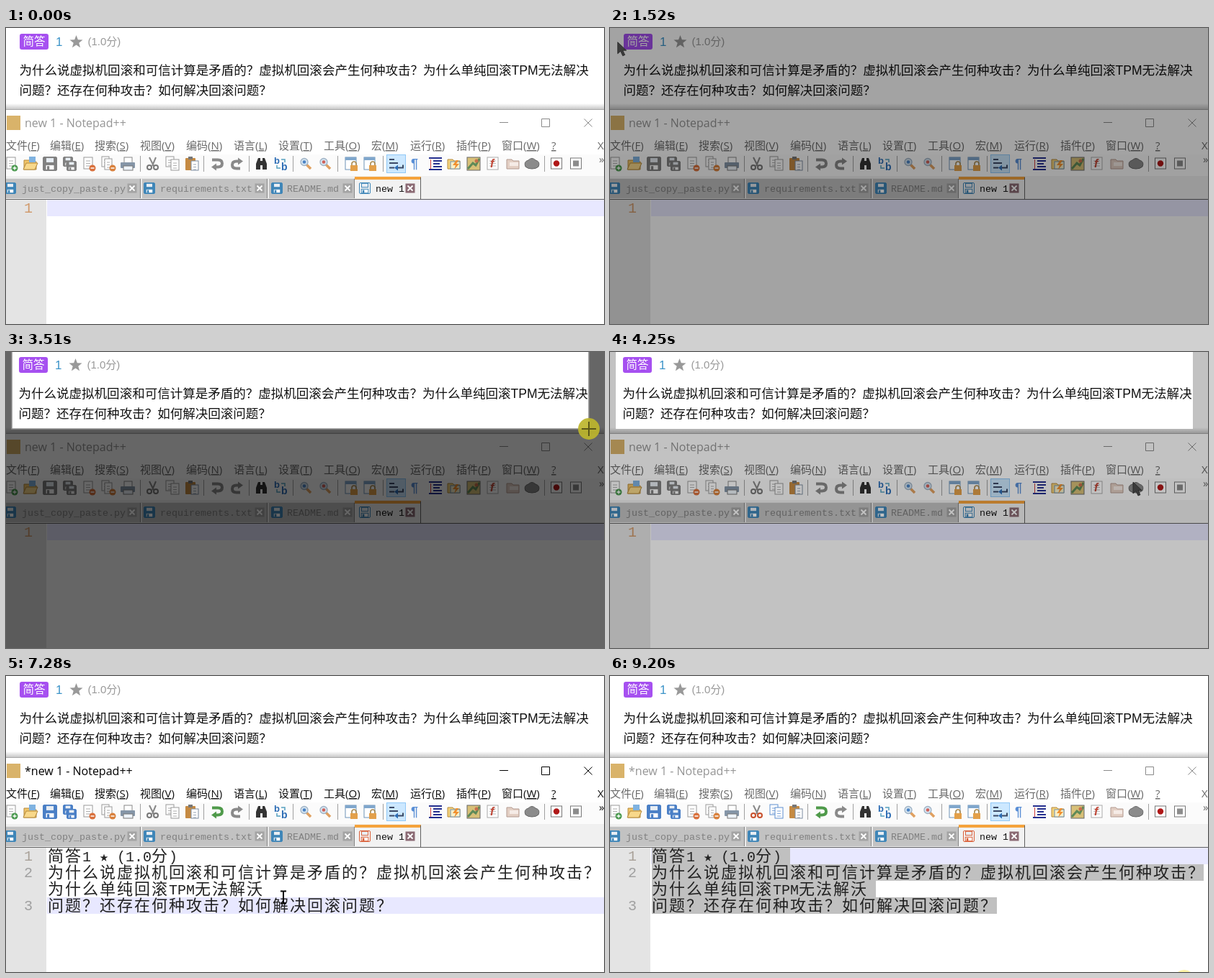
Write an HTML page that moves like this. It is 830 px wide and 412 px high and loops after 9.27 s.

```html
<!DOCTYPE html>
<html lang="zh-CN">
<head>
<meta charset="utf-8">
<title>截图识别演示</title>
<style>
html, body { margin: 0; width: 100%; height: 100%; overflow: hidden; background: #fff; }
svg { display: block; width: 830px; height: 412px; }
text { white-space: pre; }
.head { font-family: 'Liberation Sans', 'Noto Sans CJK SC', 'Noto Sans CJK', sans-serif; }
.ui { font-family: 'Open Sans', 'Noto Sans CJK SC', 'Noto Sans CJK', sans-serif; fill: var(--ui); }
.tab { font: 13.33px 'Liberation Mono', monospace; fill: #808080; }
.code { font: 20px 'Liberation Mono', 'DejaVu Sans Mono', monospace; fill: #222; }
.han { font: 300 22px 'Noto Sans CJK SC', 'Noto Sans CJK', sans-serif; letter-spacing: 2px; }
.win { fill: none; stroke: var(--btn); }
.line { fill: none; stroke-width: 2; }
#stage { --ui: #6a6a6a; --btn: #8a8a8a; --title: #959595; --save: #808080; --undo: #8a8a8a; --doc: #3f86b8; --cut: #777; --copy: #999; }
#stage.focus { --ui: #111; --btn: #000; --title: #000; }
#stage.dirty { --save: #4a7fc6; --undo: #4f9a4a; --doc: #d9603a; }
#stage.picked { --cut: #c8502c; --copy: #5f8fd0; }
</style>
</head>
<body>
<svg id="stage" viewBox="0 0 830 412"></svg>
<script>
const LOOP = 9270, STEP = 70;
const stage = document.getElementById('stage');

// ---- drawing helpers ----
const rect = (x, y, w, h, fill, more = '') =>
  `<rect x="${x}" y="${y}" width="${w}" height="${h}" fill="${fill}" ${more}/>`;
const path = (d, more) => `<path d="${d}" ${more}/>`;
const dot = (x, y, r, fill, more = '') => `<circle cx="${x}" cy="${y}" r="${r}" fill="${fill}" ${more}/>`;
const label = (x, y, size, s, more = '') => `<text x="${x}" y="${y}" font-size="${size}" ${more}>${s}</text>`;
const stroke = (d, c, w = 2) => path(d, `fill="none" stroke="${c}" stroke-width="${w}"`);

const page = (x, y, c = '#999', w = 12, h = 16) => rect(x, y, w, h, '#fff', `stroke="${c}"`) +
  stroke(`M${x + 3} ${y + 5}h${w - 6}M${x + 3} ${y + 8.5}h${w - 6}M${x + 3} ${y + 12}h${w - 6}`, c, .8);
const floppy = (x, y, s, c, body = c) => rect(x + .5, y + .5, s - 1, s - 1, body, `rx="1.5" stroke="${c}"`) +
  rect(x + s * .22, y + s * .08, s * .56, s * .34, '#e8eef4', `stroke="${c}"`) +
  rect(x + s * .2, y + s * .58, s * .6, s * .34, '#fff', `stroke="${c}"`) +
  rect(x + s * .3, y + s * .66, s * .16, s * .26, c);
const folder = (x, y, c, edge) =>
  path(`M${x} ${y + 15}v-13h7l2 2h8v11z`, `fill="${c}" stroke="${edge}"`);
const lens = (x, c) => stroke(`M${x + 1} 190l6 6`, '#e0a060', 3.5) +
  dot(x - 2, 186.5, 5, '#d5e4f0', 'stroke="#9fb2c4" stroke-width="1.3"') + dot(x - 2, 186.5, 2.3, c);
const windowIcon = (x) => rect(x - 9, 180, 15, 17, '#fff', 'stroke="#6f94b8"') + rect(x - 9, 180, 15, 4, '#7fa6cc') +
  stroke(`M${x} 191v-2a3 3 0 0 1 6 0v2`, '#a98a50', 1.6) + rect(x - 2, 191, 10, 8, '#e3a04a');
const cross = (x, y, r) => `M${x - r} ${y - r}l${2 * r} ${2 * r}M${x + r} ${y - r}l${-2 * r} ${2 * r}`;

// ---- question header ----
const starPts = Array.from({ length: 10 }, (_, i) => {
  const a = i * Math.PI / 5 - Math.PI / 2, r = i % 2 ? 4 : 9.5;
  return [97.5 + r * Math.cos(a), 19.5 + r * Math.sin(a)].map(v => v.toFixed(1)).join();
}).join(' ');

const header = `<g id="header" class="head">` +
  rect(19, 8, 40, 22, '#a650f0', 'rx="3"') +
  label(23.5, 24.3, 15.5, '简答', 'fill="#fff"') +
  label(69, 25, 17, '1', 'fill="#3b93c8"') +
  `<polygon points="${starPts}" fill="#999"/>` +
  label(113.5, 24, 15, '(1.0分)', 'fill="#999"') +
  label(18.5, 65, 17.52, '为什么说虚拟机回滚和可信计算是矛盾的？虚拟机回滚会产生何种攻击？为什么单纯回滚TPM无法解决', 'fill="#111"') +
  label(18.5, 93, 17.52, '问题？还存在何种攻击？如何解决回滚问题？', 'fill="#111"') + `</g>`;

// ---- window frame, menu, toolbar, tabs ----
const menus = [['文件', 'F', 0], ['编辑', 'E', 61], ['搜索', 'S', 123], ['视图', 'V', 186], ['编码', 'N', 250],
  ['语言', 'L', 316], ['设置', 'T', 378], ['工具', 'O', 441], ['宏', 'M', 507], ['运行', 'R', 561],
  ['插件', 'P', 625], ['窗口', 'W', 688]];
const under = s => `<tspan text-decoration="underline">${s}</tspan>`;

const frame = rect(0, 105, 830, 8, 'url(#shade)') + rect(0, 113, 830, 299, '#fff') + rect(0, 113, 830, 1, '#a8a8a8') +
  rect(1, 122, 19, 20, '#d9b36a') +
  label(26, 138, 16, '', 'id="title" class="ui" style="fill:var(--title)"') +
  path('M685 131.5h12M743.5 126.5h11v11h-11z', 'class="win"') + path(cross(808, 132, 5.5), 'class="win"') +
  menus.map(([s, k, x]) => label(x, 169, 15, `${s}(${under(k)})`, 'class="ui"')).join('') +
  label(757, 169, 15, under('?'), 'class="ui"') + label(821, 169, 15, 'X', 'class="ui"');

const toolbar = rect(0, 176, 830, 30, '#fbfbfb') +
  [186, 274, 337, 398, 460, 523, 747].map(x => rect(x, 178, 1, 22, '#a0a0a0')).join('') +
  page(1, 180) + dot(12, 195, 4.5, '#4c9a50') + stroke('M9.5 195h5M12 192.5v5', '#fff', 1.3) +
  folder(25, 182, '#f0c468', '#b58a3c') + rect(32, 179, 9, 8, '#7fb2e0') + path('M24 197l4 -9h16l-4 9z', 'fill="#f8d88a" stroke="#b58a3c"') +
  floppy(51, 179, 20, 'var(--save)') + floppy(79, 179, 14, 'var(--save)') + floppy(84, 185, 14, 'var(--save)') +
  page(108, 180) + dot(120, 195, 4.5, '#d9703c') + stroke('M117.5 195h5', '#fff', 1.5) +
  page(133, 179, '#999', 10, 14) + page(137, 182, '#999', 10, 15) + dot(148, 195, 4.5, '#d9803c') + stroke('M145.5 195h5', '#fff', 1.5) +
  rect(164, 180, 11, 8, '#fff', 'stroke="#888"') + rect(159, 187, 20, 8, '#8596a8', 'rx="1"') + rect(163, 192, 13, 6, '#eef4fa', 'stroke="#777"') +
  stroke('M199 180l6 12M208 180l-5 12', '#888') + dot(199, 194, 3, 'none', 'stroke="var(--cut)" stroke-width="2"') + dot(208, 194, 3, 'none', 'stroke="var(--cut)" stroke-width="2"') +
  page(222, 179, 'var(--copy)', 11, 14) + page(229, 183, 'var(--copy)', 11, 15) +
  rect(249, 181, 14, 17, '#c58a42', 'rx="1"') + rect(253, 179, 6, 4, '#777') + page(257, 185, '#7d8ca0', 10, 13) +
  stroke('M286 183.5h8q6 0 6 5t-6 5h-3', 'var(--undo)', 4) + path('M285 193.5l7 -5v10z', 'fill="var(--undo)"') +
  stroke('M325 195.5h-5q-6 0 -6 -5t6 -5h4', '#8a8a8a', 4) + path('M329 185.5l-7 -5v10z', 'fill="#8a8a8a"') +
  path('M347 197v-8l3 -8h3v4h3v-4h3l3 8v8h-6v-6h-3v6z', 'fill="#333"') +
  label(372, 189, 13, 'b', 'class="head" font-weight="700" fill="#2d6db5"') + label(382, 198, 14, 'b', 'class="head" font-weight="700" fill="#2d6db5"') +
  stroke('M376 191v4h5M382 183h5v4', '#55a0c0', 1.5) +
  lens(416, '#4b83c4') + lens(443, '#d06058') + windowIcon(480) + windowIcon(506) +
  rect(528.5, 176.5, 26, 25, '#cce8ff', 'stroke="#90c8f6"') +
  stroke('M532 183h7M532 188h12M532 194.5h7M542 194.5h9v-4', '#3c4a66', 2) + path('M539 194.5l5 -4v8z', 'fill="#2d6db5"') +
  label(562, 195, 18, '¶', 'class="head" font-weight="700" fill="#5a8fd6"') +
  stroke('M587 181h18M593 185h12M593 189h9M593 193h12M587 197h18', '#26308f', 1.8) + stroke('M589.5 183v13', '#d04040', 1) +
  folder(613, 181, '#f4d27a', '#b58a3c') + rect(617, 186, 13, 10, '#f8f0c8', 'stroke="#6f94b8"') + path('M625 184l-5 7h4l-2 6 7 -8h-4l3 -5z', 'fill="#f09030"') +
  rect(640, 180, 18, 18, '#d8c078', 'stroke="#666"') + stroke('M641 196l7 -8 4 3 5 -9', '#5f8a58', 3) + dot(653, 185, 2.5, '#c8704c') +
  page(668, 180, '#aaa', 15, 17) + label(672, 194, 16, 'f', 'class="head" font-style="italic" font-weight="700" fill="#c04838"') +
  folder(695, 181, '#e3cfc4', '#b39a90') + rect(699, 187, 12, 5, '#f5ebe6') +
  path('M721 193q-3 -7 4 -9q5 -5 10 0q7 2 4 9q-3 3 -9 3t-9 -3z', 'fill="#8b8b8b" stroke="#666"') +
  rect(756.5, 181, 15, 15, '#fff', 'stroke="#777"') + dot(764, 188.5, 4.2, '#b01818') +
  rect(783.5, 181, 15, 15, '#fff', 'stroke="#777"') + rect(787, 184.5, 8, 8, '#8c8c8c') +
  label(823, 188, 15, '»', 'class="ui"');

const tab = (x, w, icon, tx, name, close) => rect(x, 209, w, 28, '#c2c2c2') +
  stroke(`M${x + .5} 237v-27.5h${w - 1}`, '#e6e6e6', 1) + stroke(`M${x + w - .5} 210v27`, '#858585', 1) +
  floppy(icon - 8, 215, 16, '#3f86b8') + `<text class="tab" x="${tx}" y="228">${name}</text>` +
  rect(close - 6.5, 216.5, 13, 13, '#a4a4a4') + stroke(cross(close, 223, 3.5), '#fff', 1.8);
const tabs = rect(0, 206, 830, 32, '#f0f0f0') +
  tab(-2, 189, 6, 22, 'just_copy_paste.py', 175) + tab(188, 175, 199, 214, 'requirements.txt', 352) +
  tab(364, 120, 376, 390, 'README.md', 474) +
  rect(0, 238, 830, 1, '#606060') +
  rect(484, 207, 92, 31, '#f2f2f2') + rect(484, 207, 92, 4, '#f5a33c') + stroke('M575.5 208v30', '#606060', 1) +
  floppy(490, 215, 16, 'var(--doc)', '#f4f4f4') + `<text class="tab" x="513" y="228" style="fill:#111">new 1</text>` +
  rect(554.5, 216.5, 13, 13, '#8b6a74') + stroke(cross(561, 223, 3.5), '#fff', 1.8);

// ---- editor ----
const LEFT = 58, TOP = 239, ROW = 23;
const rows = ['简答1 ★ (1.0分)', '为什么说虚拟机回滚和可信计算是矛盾的？虚拟机回滚会产生何种攻击？', '为什么单纯回滚TPM无法解沃', '问题？还存在何种攻击？如何解决回滚问题？'];
const rowEnd = [250, 824, 369, 537];
const mixed = s => s.replace(/[\u2e80-\uffef]+/g, m => `<tspan class="han">${m}</tspan>`);
const lineNo = (n, row, id) => `<text id="${id}" class="code" x="25" y="${257 + ROW * row}" style="fill:#a0a0a0">${n}</text>`;

const editor = rect(0, TOP, 830, 173, '#fff') + rect(0, TOP, 56, 173, '#e4e4e4') +
  rect(57, TOP, 773, ROW, '#e8e8ff', 'id="current"') +
  rows.map((_, i) => rect(LEFT, TOP + ROW * i, 0, ROW, '#c0c0c0', `id="sel${i}"`)).join('') +
  lineNo(1, 0, 'first') + `<g id="doc">` + lineNo(2, 1, 'second') + lineNo(3, 3, 'third') +
  rows.map((s, i) => `<text class="code" x="${LEFT}" y="${257.5 + ROW * i}">${mixed(s)}</text>`).join('') + `</g>` +
  rect(536, 308, 1, ROW, '#000', 'id="caret"');

// ---- overlays ----
const overlays = rect(0, 0, 830, 412, '#000', 'id="dim"') +
  `<g id="shot"><g clip-path="url(#crop)">${rect(0, 0, 830, 125, '#fff')}<use href="#header" x="-1" y="-1"/></g>` +
  rect(8, -2, 0, 0, 'none', 'id="edge" stroke="#8c8c8c" stroke-width="1.5"') + `</g>` +
  `<g id="mouse">` + dot(0, 0, 15, '#fff', 'id="halo"') +
  path('M0 0v16l4 -3.5 3 6.5 3 -1.3 -3 -6.2h5z', 'id="arrow" fill="#3c3c3c" stroke="#222" stroke-width=".8"') +
  path('M-4 -8.5h3q1 0 1 1v15q0 1 -1 1h-3M4 -8.5h-3q-1 0 -1 1M0 7.5q0 1 1 1h3', 'id="beam" class="line" stroke="#000"') +
  path('M-10 0h20M0 -10v20', 'id="plus" class="line" stroke="#5c5818"') + `</g>`;

stage.innerHTML = `<defs><linearGradient id="shade" x2="0" y2="1"><stop stop-color="#fff"/><stop offset="1" stop-color="#c8c8c8"/></linearGradient>
  <clipPath id="crop"><rect id="cropBox" x="8" y="0"/></clipPath></defs>` +
  rect(0, 0, 830, 412, '#fff') + header + frame + toolbar + tabs + editor + overlays;

// ---- motion ----
const bursts = [0, 410, 1390, 2260, 3240, 4040, 5530, 5940, 6680, 7280, 8320, 9130];
const track = [[0, 797, 440], [340, 797, 440], [870, 380, 200], [1320, 16, 32], [1390, 11, 22], [2020, 8, 1], [2259, 8, 1],
  [2260, 70, 50], [2400, 246, 87], [2470, 316, 94], [2750, 540, 104], [3170, 802, 110], [3380, 809, 107], [4039, 809, 107],
  [4040, 805, 112], [4250, 726, 181], [4600, 319, 258], [5529, 319, 258], [5740, 363, 287], [6080, 363, 287],
  [6360, 385, 308], [7280, 385, 308], [7490, 545, 340], [7630, 545, 340], [8120, 14, 227], [8319, 14, 227],
  [8880, 705, 425], [9129, 705, 425], [9130, 797, 424], [LOOP, 797, 424]];
const presses = [[2260, 4040], [5940, 6080], [7560, 8320], [9130, LOOP]];

const clamp = (v, a, b) => Math.max(a, Math.min(b, v));
const ramp = (t, a, b) => clamp((t - a) / (b - a), 0, 1);
const el = id => document.getElementById(id);
const set = (id, attrs) => { for (const k in attrs) el(id).setAttribute(k, attrs[k]); };
const show = (id, on) => set(id, { display: on ? 'inline' : 'none' });

function pointer(t) {
  const i = Math.max(1, track.findIndex(k => k[0] >= t));
  const [a, b] = [track[i - 1], track[i]], p = ramp(t, a[0], b[0]);
  return [a[1] + (b[1] - a[1]) * p, a[2] + (b[2] - a[2]) * p];
}

function snap(t) {
  const start = bursts.filter(b => b <= t).pop();
  return start + Math.floor((t - start) / STEP) * STEP;
}

function drawMouse(t) {
  const [x, y] = pointer(t), shooting = t >= 1530 && t < 4040;
  const kind = shooting ? 'plus' : x > 57 && y > TOP ? 'beam' : 'arrow';
  set('mouse', { transform: `translate(${x.toFixed(1)} ${y.toFixed(1)})` });
  for (const k of ['plus', 'beam', 'arrow']) show(k, k === kind);
  show('halo', presses.some(([a, b]) => t >= a && t < b));
  set('halo', shooting ? { fill: '#bdb52c', opacity: .92 } : { fill: '#f8e85a', opacity: .55 });
}

function drawShot(t) {
  set('dim', { opacity: .6 * (ramp(t, 1250, 1600) - ramp(t, 4040, 4390)) });
  show('shot', t >= 2260 && t < 4390);
  const [x, y] = pointer(clamp(t - STEP, 0, 3900));
  const size = { width: Math.max(0, x - 8), height: Math.max(0, y) };
  set('cropBox', size);
  set('edge', { width: size.width, height: size.height + 2 });
  show('edge', t < 4040);
}

function drawEditor(t, raw) {
  const pasted = t >= 6680, picking = t >= 7630;
  const [x, y] = pointer(Math.min(t, 8300));
  const row = picking ? clamp(Math.floor((y - TOP) / ROW), 0, 3) : pasted ? 3 : 0;
  const from = clamp(LEFT + Math.round((x - LEFT) / 24) * 24, LEFT, rowEnd[row]);
  rowEnd.forEach((end, i) => {
    const a = i === row ? from : LEFT;
    set('sel' + i, { x: a, width: picking && i >= row ? end - a : 0 });
  });
  const wrapped = row === 1 || row === 2;
  set('current', { y: TOP + ROW * (wrapped ? 1 : row), height: wrapped ? 2 * ROW : ROW });
  show('doc', pasted);
  show('caret', raw >= 6680 && raw < 6880);
  el('first').style.fill = pasted ? '#a8a098' : '#d0996a';
  el('title').textContent = (pasted ? '*' : '') + 'new 1 - Notepad++';
  stage.classList.toggle('focus', t >= 5940 && t < 9130);
  stage.classList.toggle('dirty', pasted);
  stage.classList.toggle('picked', t >= 7700);
}

function render(now) {
  const raw = now % LOOP, t = snap(raw);
  drawMouse(t);
  drawShot(t);
  drawEditor(t, raw);
}

function tick() {
  render(performance.now());
  requestAnimationFrame(tick);
}
tick();
</script>
</body>
</html>
```
